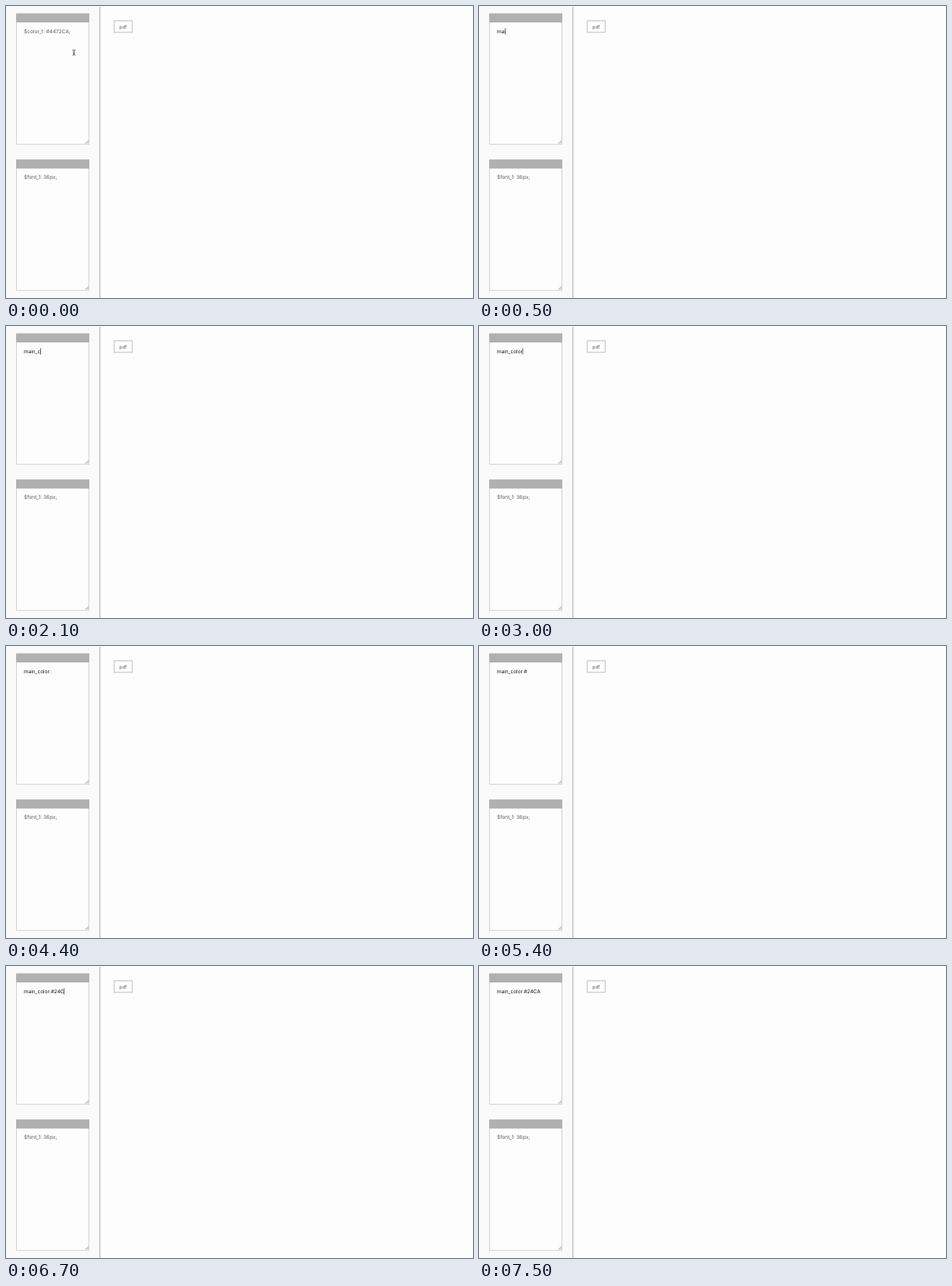
Animation, 600 px wide and 375 px high, one loop 8000 ms. Source, as an HTML page:

```html
<!DOCTYPE html>
<html lang="en">
<head>
<meta charset="utf-8">
<title>Style editor</title>
<style>
  html, body { margin: 0; width: 100%; height: 100%; overflow: hidden; background: #fdfdfd; }
  svg { display: block; width: 600px; height: 375px; }
  text { font: 6.55px Inter, "Liberation Sans", sans-serif; fill: #5c5c5c; text-rendering: geometricPrecision; white-space: pre; }
  #typed { font-size: 6.45px; fill: #111; }
  .label { font-size: 6px; }
</style>
</head>
<body>
<svg viewBox="0 0 600 375" xmlns="http://www.w3.org/2000/svg">
  <defs>
    <g id="panel">
      <rect x=".5" y=".5" width="93" height="167.5" fill="#fdfdfd" stroke="#d2d2d2"/>
      <rect width="94" height="11.5" fill="#b0b0b0"/>
      <path d="M89 167l4-4M91 167l2-2" stroke="#888" stroke-width=".8"/>
    </g>
  </defs>
  <rect width="600" height="375" fill="#fdfdfd"/>
  <rect width="120" height="375" fill="#fafafa"/>
  <rect x="120" y="1" width="1.2" height="374" fill="#b9b9b9"/>
  <use href="#panel" x="13" y="9.6"/>
  <use href="#panel" x="13" y="197.2"/>
  <rect x="139" y="19" width="23.2" height="14.8" fill="#fefefe" stroke="#bcbcbc"/>
  <text class="label" x="150.5" y="28.6" text-anchor="middle">pdf</text>
  <text x="23" y="222.3">$font_1: 36px;</text>
  <g id="idle">
    <text x="23" y="35.1">$color_1: #4472CA;</text>
    <path d="M85.4 56.4q1.6 0 1.9 .9q.3-.9 1.9-.9M87.3 57v5.6M85.4 63.2q1.6 0 1.9-.9q.3 .9 1.9 .9M86.4 60.4h1.8" fill="none" stroke="#222" stroke-width=".8"/>
  </g>
  <text id="typed" x="23" y="35.2"></text>
  <rect id="caret" y="28.5" width=".7" height="8.2" fill="#222"/>
</svg>
<script>
const LOOP = 8000;
const CARET_ON = 500; // the caret stays lit this long after a key press
const PHRASE = "main_color:#24CA";
// Key presses, in tenths of a second
const keys = [1, 2, 5, 7, 16, 21, 23, 26, 28, 30, 38, 49, 57, 60, 67, 70];

const [idle, typed, caret] = ["idle", "typed", "caret"].map(id => document.getElementById(id));
const show = (el, on) => el.setAttribute("visibility", on ? "visible" : "hidden");

function draw(time) {
  const pressed = keys.filter(key => key * 100 <= time);
  const lastPress = pressed.length ? pressed.at(-1) * 100 : -Infinity;
  typed.textContent = PHRASE.slice(0, pressed.length);
  show(idle, !pressed.length);
  show(caret, time - lastPress < CARET_ON);
  caret.setAttribute("x", 22.8 + typed.getComputedTextLength());
}

const start = performance.now();
function tick() {
  draw((performance.now() - start) % LOOP);
  requestAnimationFrame(tick);
}
tick();
</script>
</body>
</html>
```
